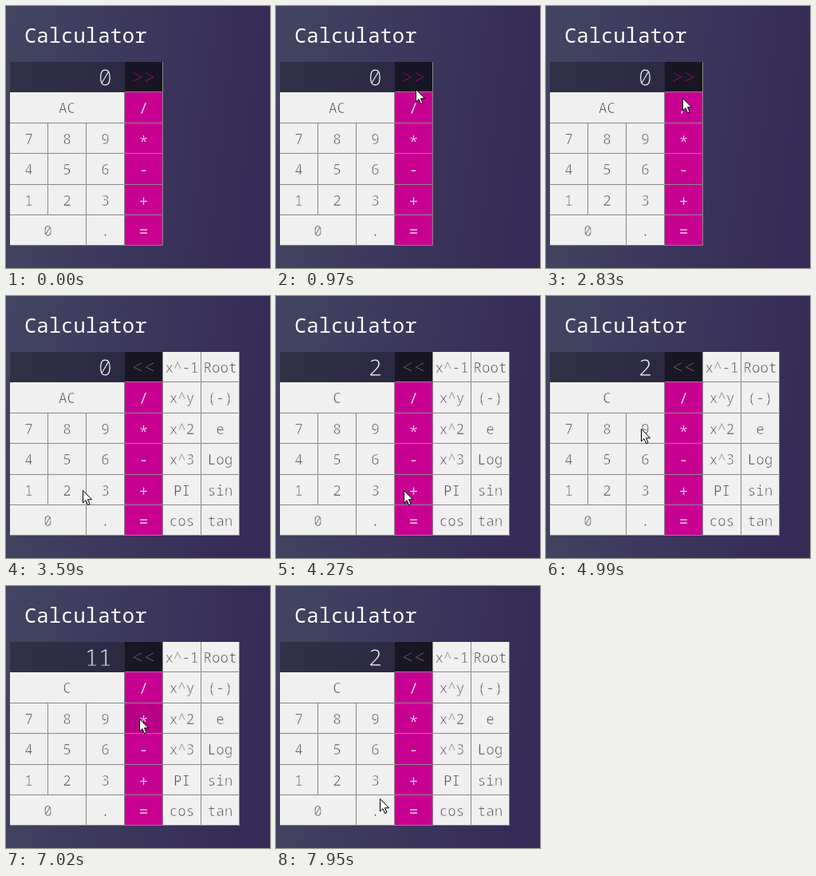
An HTML page for the animation above (8 s loop, 331 by 328 pixels).

```html
<!DOCTYPE html>
<html lang="en">
<head>
<meta charset="utf-8">
<title>Calculator</title>
<style>
  html, body { margin: 0; width: 100%; height: 100%; overflow: hidden; background: #3c3659; }
  svg { display: block; width: 331px; height: 328px; }
  /* A stroke in the key colour thins the letters. */
  text { font: 200 17.6px "Noto Sans Mono", monospace; text-anchor: middle; stroke-width: .7px; }
  .title { font-size: 25.6px; font-weight: 400; fill: #fff; text-anchor: start; }
  .display { font-size: 28.8px; fill: #fff; stroke: #2f2e47; stroke-width: 1.2px; text-anchor: end; }
  .key rect { fill: #f0f0f0; }
  .key text { fill: #444; stroke: #f0f0f0; }
  .operator rect { fill: #c80092; }
  .operator text { font-size: 20px; fill: #fff; stroke: #c80092; stroke-width: .4px; }
  .toggle rect { fill: #191623; }
  .toggle text { font-size: 25.6px; fill: #d0009a; stroke: #191623; stroke-width: 1.1px; }
  .toggle.open text { fill: #a8729c; }
  .pressed rect { filter: brightness(.92); }
  .edge { fill: none; stroke: #888; }
</style>
</head>
<body>
<svg viewBox="0 0 331 328">
  <defs>
    <linearGradient id="backdrop" gradientUnits="userSpaceOnUse" x1="0" y1="0" x2="331" y2="40">
      <stop stop-color="#434562"/>
      <stop offset="1" stop-color="#362b56"/>
    </linearGradient>
  </defs>
  <rect width="331" height="328" fill="url(#backdrop)"/>
  <text class="title" x="23" y="46">Calculator</text>
  <rect x="5" y="70" width="144" height="38" fill-opacity=".28"/>
  <text class="display" id="display" x="133" y="100"></text>
  <g id="keys"></g>
  <g id="panel"></g>
  <path id="cursor" d="M.5 .5V16L4 12.7L6.6 18.7L9 17.6L6.5 11.8H11.5Z" fill="#fff" stroke="#000"/>
</svg>
<script>
const LOOP = 8000, LEFT = 5, TOP = 70, COLUMN = 48, ROW = 38.4;
const REST = 100; // pause before and after each stop of the pointer
const get = id => document.getElementById(id);
const keys = {};

function make(parent, tag, attributes, content = "") {
  const node = document.createElementNS("http://www.w3.org/2000/svg", tag);
  for (const name in attributes) node.setAttribute(name, attributes[name]);
  node.textContent = content;
  return parent.appendChild(node);
}

function addKey(parent, label, column, row, { span = 1, kind = "", drop = 0 } = {}) {
  const rowTop = n => Math.round(TOP + n * ROW);
  const x = LEFT + column * COLUMN, y = rowTop(row);
  const width = span * COLUMN, height = rowTop(row + 1) - y;
  const group = make(parent, "g", { class: "key " + kind });
  make(group, "rect", { x, y, width, height });
  make(group, "path", { class: "edge", d: `M${x} ${y + height - .5}h${width - .5}V${y}` });
  const text = make(group, "text", { x: x + width / 2 - .5, y: y + 26 + drop }, label);
  keys[label] = { group, text, spot: [x + width * .38, y + height * .5] };
}

addKey(get("keys"), "toggle", 3, 0, { kind: "toggle", drop: 2 });
addKey(get("keys"), "AC", 0, 1, { span: 3 });
["789", "456", "123"].forEach((digits, i) =>
  [...digits].forEach((digit, column) => addKey(get("keys"), digit, column, i + 2)));
addKey(get("keys"), "0", 0, 5, { span: 2 });
addKey(get("keys"), ".", 2, 5);
[..."/*-+="].forEach((sign, i) =>
  addKey(get("keys"), sign, 3, i + 1, { kind: "operator", drop: sign === "*" ? 4 : 1 }));
"x^-1 Root x^y (-) x^2 e x^3 Log PI sin cos tan".split(" ").forEach((label, i) =>
  addKey(get("panel"), label, 4 + i % 2, Math.floor(i / 2)));
keys.toggle.spot = [175, 104];

// The pointer's walk over the keys
const pass = (time, key) => ({ time, key });
const press = (time, key) => ({ time, key, pressed: true });
const walk = [
  pass(-50, "PI"), press(1000, "toggle"), press(2150, "toggle"), pass(2600, "/"),
  press(3050, "toggle"), pass(3400, "3"), press(3790, "2"), press(4400, "+"),
  pass(4990, "9"), press(5240, "9"), press(5990, "="), press(6950, "*"),
  press(7740, "2"), pass(8120, "=")
];
const presses = walk.filter(stop => stop.pressed);

function pointerAt(time) {
  const next = walk.findIndex(stop => stop.time > time);
  const from = walk[next - 1], to = walk[next];
  const progress = (time - from.time - REST) / (to.time - from.time - 2 * REST);
  const p = Math.min(1, Math.max(0, progress));
  const [x, y] = keys[from.key].spot, [toX, toY] = keys[to.key].spot;
  return [x + (toX - x) * p, y + (toY - y) * p].map(Math.round);
}

const operations = { "+": (a, b) => a + b, "*": (a, b) => a * b };

function calculate(sequence) {
  let shown = 0, stored = 0, operation = null;
  for (const key of sequence) {
    if (operations[key]) {
      stored = shown;
      operation = operations[key];
    } else {
      shown = key === "=" ? operation(stored, shown) : Number(key);
    }
  }
  return shown;
}

function draw(time) {
  const done = presses.filter(stop => stop.time <= time).map(stop => stop.key);
  const entered = done.filter(key => key !== "toggle");
  const open = (done.length - entered.length) % 2 === 1;
  get("panel").style.display = open ? "" : "none";
  keys.toggle.group.classList.toggle("open", open);
  keys.toggle.text.textContent = open ? "<<" : ">>";
  keys.AC.text.textContent = entered.length ? "C" : "AC";
  get("display").textContent = calculate(entered);
  for (const label in keys) {
    const held = presses.some(stop =>
      stop.key === label && time >= stop.time && time < stop.time + REST);
    keys[label].group.classList.toggle("pressed", held);
  }
  get("cursor").style.display = time < 50 ? "none" : "";
  get("cursor").setAttribute("transform", `translate(${pointerAt(time)})`);
}

const start = performance.now();
function tick() {
  draw((performance.now() - start) % LOOP);
  requestAnimationFrame(tick);
}
tick();
</script>
</body>
</html>
```
